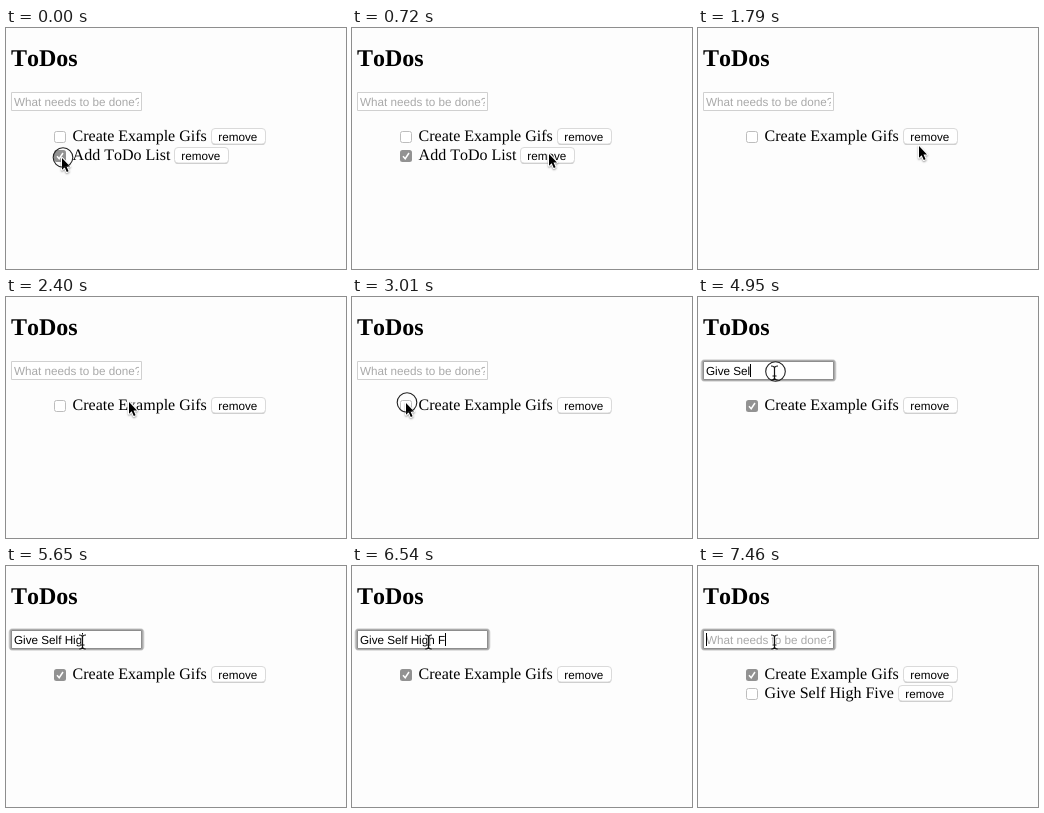
Recreate the animation shown at these times as an HTML page with a canvas. Size 340 px wide and 241 px high, loop 7990 ms.

```html
<!DOCTYPE html>
<html lang="en">
<head>
<meta charset="utf-8">
<title>ToDos</title>
<style>
  html, body { margin: 0; width: 100%; height: 100%; overflow: hidden; background: #fdfdfd; }
  canvas { display: block; width: 340px; height: 241px; }
</style>
</head>
<body>
<canvas id="stage"></canvas>
<script>
const W = 340, H = 241, LOOP = 7990;
const PAPER = '#fdfdfd';
const SERIF = '"Liberation Serif", Times, serif';
const SANS = '11.7px "Liberation Sans", Arial, sans-serif';

const canvas = document.getElementById('stage');
const ctx = canvas.getContext('2d');
const dpr = window.devicePixelRatio || 1;
canvas.width = W * dpr;
canvas.height = H * dpr;
ctx.scale(dpr, dpr);
ctx.fontKerning = 'none';
ctx.textRendering = 'geometricPrecision';

const REMOVE = 1340, CHECK = 3100, LEAVE = 3720, FOCUS = 4950, SUBMIT = 7460;
const STEP = 87, BLINK = 530;
const phrase = 'Give Self High Five';

const home = { x: 55, y: 129 };
const moves = [
  { at: 540, steps: 3, x: 196, y: 125, ease: 1 },
  { at: 1790, steps: 3, x: 240, y: 110, ease: 2 },
  { at: 2050, steps: 7, x: 75, y: 102, ease: 1 },
  { at: 2660, steps: 3, x: 53, y: 105, ease: 2 },
  { at: 3550, steps: 2, x: 265, y: 221, ease: 1 }
];
const clicks = [[0, 90], [1250, REMOVE], [3010, 3190], [FOCUS, 5040]];
const bursts = [
  { at: 5040, gap: 140, count: 6 },
  { at: 6370, gap: 135, count: 5 }
];

// The pointer advances in discrete steps, as a screen recorder samples it.
function pointerAt(t) {
  let { x, y } = home;
  for (const m of moves) {
    if (t < m.at) break;
    const p = Math.min(1, (Math.floor((t - m.at) / STEP) + 1) / m.steps);
    const k = 1 - (1 - p) ** m.ease;
    x += (m.x - x) * k;
    y += (m.y - y) * k;
  }
  return { x: Math.round(x), y: Math.round(y) };
}

function typingAt(t) {
  let count = 8, last = FOCUS;
  for (const { at, gap, count: max } of bursts) {
    if (t < at) break;
    const n = Math.min(max, Math.floor((t - at) / gap) + 1);
    count += n;
    last = at + (n - 1) * gap;
  }
  return { str: phrase.slice(0, count), last };
}

function text(str, x, y, font, color = '#000') {
  ctx.font = font;
  ctx.fillStyle = color;
  ctx.fillText(str, x, y);
  return ctx.measureText(str).width;
}

function box(x, y, w, h, r, fill, stroke, line = 1) {
  ctx.beginPath();
  ctx.roundRect(x, y, w, h, r);
  if (fill) {
    ctx.fillStyle = fill;
    ctx.fill();
  }
  if (stroke) {
    ctx.strokeStyle = stroke;
    ctx.lineWidth = line;
    ctx.stroke();
  }
}

function path(points, close) {
  ctx.beginPath();
  points.forEach(([x, y]) => ctx.lineTo(x, y));
  if (close) ctx.closePath();
}

function checkbox(y, checked) {
  if (!checked) {
    box(48.5, y + .5, 11, 11, 2, '#fff', '#bdbdbd');
    return;
  }
  box(48, y, 12, 12, 2.5, '#929292');
  path([[51, y + 6.2], [53.2, y + 8.7], [57, y + 3]]);
  ctx.strokeStyle = '#fff';
  ctx.lineWidth = 1.5;
  ctx.stroke();
}

function button(x, y) {
  box(x + .5, y + 1, 54, 16, 3.5, '#c6c6c6');
  box(x + .5, y + .5, 54, 15.5, 3.5, '#fff', '#dadada');
  text('remove', x + 7.3, y + 13, SANS);
}

function item(row, label, checked) {
  const y = row * 19;
  checkbox(103 + y, checked);
  const w = text(label, 66.6, 113 + y, '16px ' + SERIF);
  button(Math.round(70.6 + w), 100 + y);
}

function input(t) {
  const focused = t >= FOCUS;
  if (focused) {
    box(5, 64.5, 131, 18, 2, null, 'rgba(120,120,120,.22)', 5);
    box(5, 64.5, 131, 18, 1, null, 'rgba(120,120,120,.5)', 3);
  }
  box(5.5, 64.5, 130, 18, 0, '#fff', focused ? '#8e8e8e' : '#d0d0d0');

  const typing = focused && t < SUBMIT;
  const { str, last } = typing ? typingAt(t) : { str: 'What needs to be done?', last: SUBMIT };
  ctx.save();
  ctx.beginPath();
  ctx.rect(8, 66, 125, 16);
  ctx.clip();
  const w = text(str, 8, 78, SANS, typing ? '#000' : '#a9a9a9');
  ctx.restore();

  if (focused && Math.floor((t - last) / BLINK) % 2 === 0) {
    ctx.fillStyle = '#000';
    ctx.fillRect(typing ? Math.round(8 + w) : 8, 67, 1, 13);
  }
}

function arrow({ x, y }) {
  ctx.save();
  ctx.translate(x, y);
  path([[1, 1], [1, 12.7], [3.7, 10.2], [5.8, 15], [7.6, 14.2], [5.5, 9.5], [9, 9.5]], true);
  ctx.lineJoin = 'round';
  ctx.lineWidth = 2;
  ctx.strokeStyle = '#fff';
  ctx.shadowColor = 'rgba(0,0,0,.4)';
  ctx.shadowBlur = 2 * dpr;
  ctx.shadowOffsetY = dpr;
  ctx.stroke();
  ctx.shadowColor = 'transparent';
  ctx.fillStyle = '#000';
  ctx.fill();
  ctx.restore();
}

function beam(x, y) {
  ctx.beginPath();
  for (const s of [-1, 1]) {
    ctx.moveTo(x - 3.5, y + s * 7);
    ctx.quadraticCurveTo(x, y + s * 7, x, y + s * 5);
    ctx.quadraticCurveTo(x, y + s * 7, x + 3.5, y + s * 7);
  }
  ctx.moveTo(x, y - 6);
  ctx.lineTo(x, y + 6);
  ctx.moveTo(x - 2, y + 3);
  ctx.lineTo(x + 2, y + 3);
  ctx.strokeStyle = 'rgba(255,255,255,.7)';
  ctx.lineWidth = 2.4;
  ctx.stroke();
  ctx.strokeStyle = '#111';
  ctx.lineWidth = 1.2;
  ctx.stroke();
}

function ring(x, y) {
  ctx.beginPath();
  ctx.arc(x, y, 9.8, 0, Math.PI * 2);
  ctx.strokeStyle = '#222';
  ctx.lineWidth = 1.1;
  ctx.stroke();
}

function cursor(t) {
  const clicked = clicks.some(([from, to]) => t >= from && t < to);
  if (t < LEAVE) {
    const p = pointerAt(t);
    arrow(p);
    if (clicked) ring(p.x + 2, p.y + .5);
  } else if (t >= FOCUS) {
    beam(76.5, 76);
    if (clicked) ring(77.5, 74.5);
  }
}

function draw(t) {
  ctx.fillStyle = PAPER;
  ctx.fillRect(0, 0, W, H);
  text('ToDos', 5, 38, 'bold 24px ' + SERIF);
  input(t);
  item(0, 'Create Example Gifs', t >= CHECK);
  if (t < REMOVE) item(1, 'Add ToDo List', true);
  if (t >= SUBMIT) item(1, phrase, false);
  cursor(t);
}

const start = performance.now();
function tick() {
  draw((performance.now() - start) % LOOP);
  requestAnimationFrame(tick);
}
tick();
</script>
</body>
</html>
```
